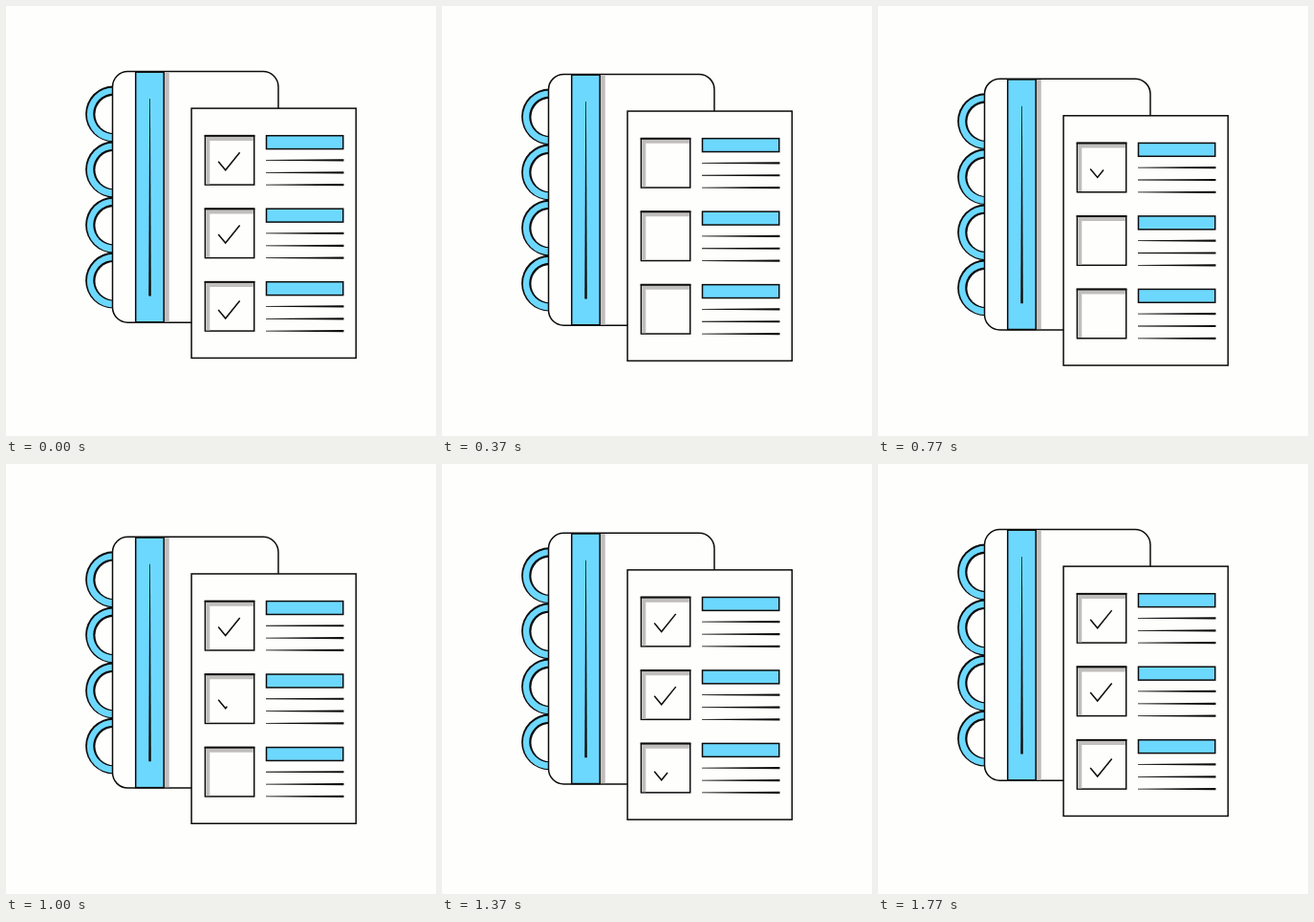
Animation of 450 by 450 pixels, one loop 1.8 s. Source, as an HTML page:

```html
<!DOCTYPE html>
<html lang="en">
<head>
<meta charset="utf-8">
<title>Checklist</title>
<style>
  html, body { margin: 0; width: 100%; height: 100%; overflow: hidden; background: #fefefc; }
  svg { display: block; width: 100vw; height: 100vh; }
  .line { stroke: #0c0c0c; stroke-width: 1.5; }
  .ink { fill: #0c0c0c; }
  .paper { fill: #fefefd; }
  .blue { fill: #6dd8fd; }
  .shade { fill: #c0bfbe; }
  .tick { fill: none; stroke: #0c0c0c; stroke-width: 1.5; }
</style>
</head>
<body>
<svg viewBox="0 0 450 450">
  <g id="scene">
    <g id="rings"></g>
    <rect class="paper line" x="111.5" y="68.5" width="173.5" height="262.7" rx="16"/>
    <rect class="shade" x="166" y="69.3" width="4.8" height="261.1"/>
    <rect class="blue line" x="135.7" y="69.2" width="29.5" height="261.6"/>
    <path class="ink" d="M150.2 97H150.9L151.8 303.5H149.3Z"/>
    <rect class="paper line" x="194.1" y="107.1" width="172.2" height="261.3"/>
    <g id="rows"></g>
  </g>
</svg>
<script>
const LOOP = 1800, DRAW = 1000 / 3, DEPTH = 8.1;
const ROW_GAP = 76.5, RING_GAP = 58.1;
const TICK_DROP = [0.2, 0, 2.5];
const NS = 'http://www.w3.org/2000/svg';
const scene = document.getElementById('scene');
const rings = document.getElementById('rings');
const rows = document.getElementById('rows');

function add(parent, tag, attrs) {
  const el = document.createElementNS(NS, tag);
  for (const key in attrs) el.setAttribute(key, attrs[key]);
  return parent.appendChild(el);
}

function addRing(cy) {
  const disc = (cls, dx, dy, r) =>
    add(rings, 'circle', { class: cls, cx: 112.5 + dx, cy: cy + dy, r });
  disc('ink', 0, 0, 29.4);
  disc('blue', 0.2, 0.5, 27.9);
  disc('ink', 0, 0, 21.3);
  disc('paper', 0.6, 0.5, 19.7);
}

function addRow(y, drop) {
  const row = add(rows, 'g', { transform: `translate(0 ${y})` });
  add(row, 'rect', { class: 'paper line', x: 208.4, y: 0, width: 51.3, height: 51.4 });
  add(row, 'path', { class: 'shade', d: 'M209.1 .7H259V5.2H213.3V50.7H209.1Z' });
  add(row, 'rect', { class: 'ink', x: 207.7, y: -0.8, width: 52.6, height: 1.9 });
  add(row, 'rect', { class: 'blue line', x: 272.5, y: 0, width: 80.3, height: 13.9 });
  for (const ly of [25.7, 38.6, 51.4]) {
    add(row, 'path', { class: 'ink', d: `M272 ${ly - 0.4}L353.5 ${ly - 1.1}V${ly + 1.1}L272 ${ly + 0.4}Z` });
  }
  return add(row, 'path', {
    class: 'tick', d: 'M222.2 26.8L229.7 35.8L244.7 17.2',
    transform: `translate(0 ${drop})`, pathLength: 1, 'stroke-dasharray': '1 2'
  });
}

for (let i = 0; i < 4; i++) addRing(112.9 + i * RING_GAP);
const ticks = TICK_DROP.map((drop, i) => addRow(135.7 + i * ROW_GAP, drop));

const clamp = v => Math.min(1, Math.max(0, v));

function render(t) {
  const drop = DEPTH * (1 - Math.cos(2 * Math.PI * t / LOOP)) / 2;
  scene.setAttribute('transform', `translate(0 ${drop.toFixed(3)})`);
  ticks.forEach((tick, i) => {
    // All ticks retract first, then each is drawn in turn.
    const shown = t < DRAW ? 1 - t / DRAW : clamp((t - 567 - i * 300) / DRAW);
    tick.setAttribute('stroke-dashoffset', 1 - shown);
    tick.setAttribute('visibility', shown > 0 ? 'visible' : 'hidden');
  });
}

const start = performance.now();
function frame() {
  render((performance.now() - start) % LOOP);
  requestAnimationFrame(frame);
}
frame();
</script>
</body>
</html>
```
